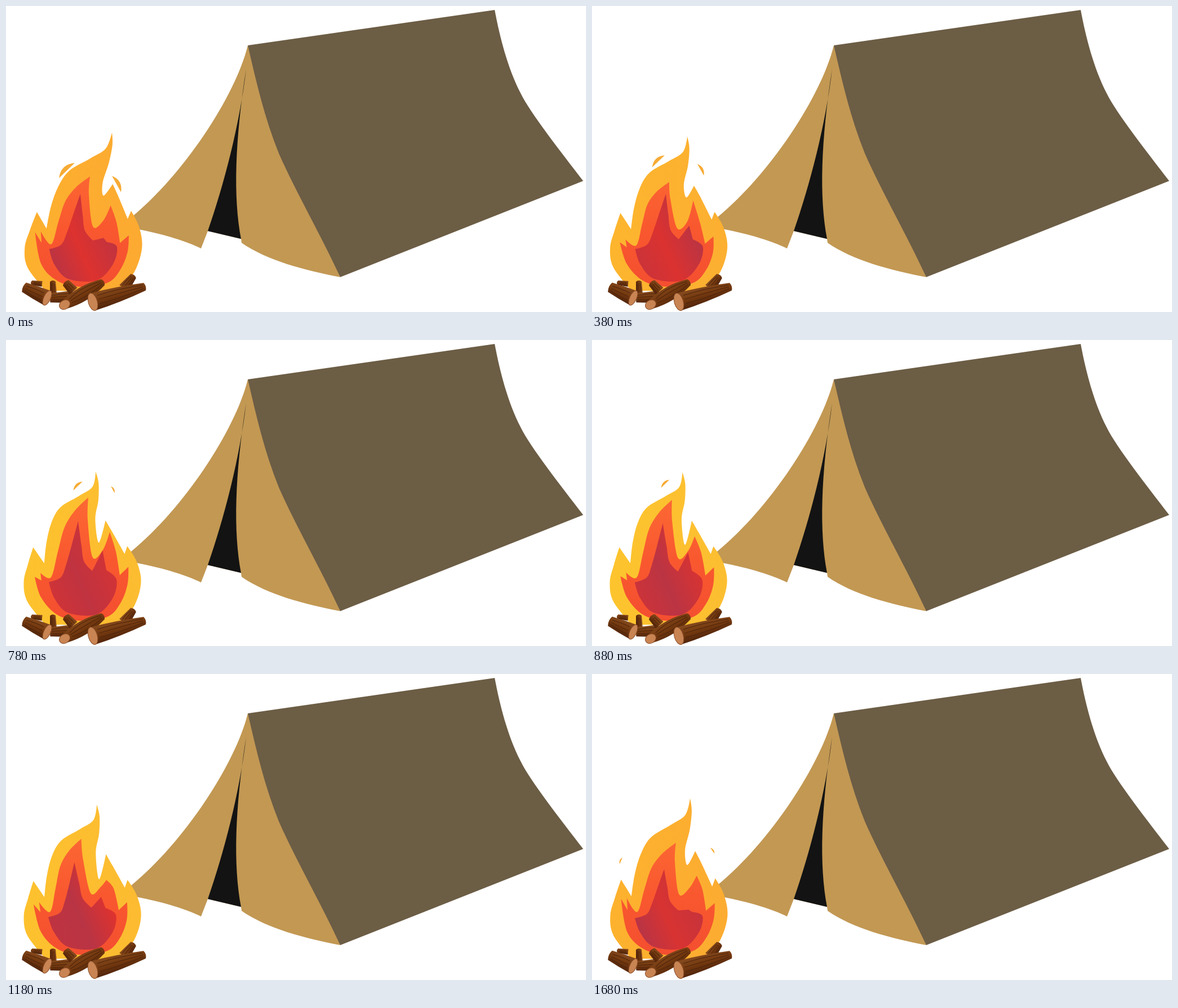
These frames come from a looping animation (1029x544 px, 1.78 s). An HTML page with a canvas:

```html
<!DOCTYPE html>
<html>
<head>
<meta charset="utf-8">
<title>Campfire and tent</title>
<style>
html, body { margin: 0; width: 100%; height: 100%; overflow: hidden; background: #fff; }
canvas { display: block; }
</style>
</head>
<body>
<canvas id="stage" width="1029" height="544"></canvas>
<script>
const ctx = document.getElementById('stage').getContext('2d');
const LOOP = 1780, STEPS = 18, BASE = 495;
const KEYS = [0, 4, 6, 8, 11, 14, 17, STEPS]; // steps at which the tips reach their key places

const points = text => text.split(' ').map(s => {
  const [x, y] = s.replace('*', '').split(',').map(Number);
  return { x, y, corner: s[0] === '*' };
});
const mix = (a, b, k) => a + (b - a) * k;
const wave = (phase, peak) => Math.cos(2 * Math.PI * (phase - peak));

// rest: resting outline, * marks a sharp corner. tip: path of the top point.
// dips: places that sink by a wave, each as x, y, depth and phase of the lowest point.
const outer = {
  rest: points('*167,228 171,249 169,281 162,316 167,350 *180,318 191,338 *212,379 *217,365 233,393 240,430 228,472 *200,508 *70,506 38,465 32,430 40,398 *50,367 *69,396 74,358 84,322 101,294 135,273 160,256'),
  tip: points('188,225 169,232 161,222 159,234 163,237 157,223 174,221'),
  dips: [[166, 350, 15, .6]]
};
const middle = {
  rest: points('*140,294 141,330 152,390 170,378 *181,352 193,381 *201,420 *216,406 215,436 203,468 180,492 130,499 90,488 62,458 *50,411 *62,424 *60,407 79,423 90,381 100,342 117,315'),
  tip: points('149,303 137,313 146,280 146,280 134,293 133,293 149,300'),
  dips: [[181, 352, 16, .73], [52, 411, 13, .4]]
};
const inner = {
  rest: points('*127,333 133,370 138,398 *153,415 *171,396 *178,416 196,428 189,460 160,488 110,485 86,460 *76,432 97,424 106,404 116,371'),
  tip: points('132,334 131,334 131,334 128,322 121,333 122,338 128,347'),
  dips: [[171, 396, -18, .42]]
};

// Each spark starts at x, y, drifts by dx, dy and shrinks along its length vx, vy
const sparks = [
  { from: 0, life: 11, x: 94, y: 306, dx: 35, dy: -53, vx: 28, vy: -27 },
  { from: 0, life: 8, x: 188, y: 302, dx: -2, dy: -42, vx: 16, vy: 29 },
  { from: 13, life: 4, x: 45, y: 378, dx: 4, dy: -40, vx: 12, vy: -28 },
  { from: 13, life: 4, x: 192, y: 310, dx: 18, dy: -1, vx: 17, vy: 25 }
];

function fill(path, color) {
  ctx.fillStyle = color;
  ctx.fill(new Path2D(path));
}

function gradient(x0, y0, x1, y1, colors) {
  const g = ctx.createLinearGradient(x0, y0, x1, y1);
  colors.forEach((c, n) => g.addColorStop(n / (colors.length - 1), c));
  return g;
}

function along(path, step) {
  let i = 0;
  while (step >= KEYS[i + 1]) i++;
  const k = (step - KEYS[i]) / (KEYS[i + 1] - KEYS[i]);
  const a = path[i], b = path[(i + 1) % path.length];
  return { x: mix(a.x, b.x, k), y: mix(a.y, b.y, k) };
}

// The outline follows its tip, more so with height
function bent({ rest, tip, dips }, step) {
  const top = rest[0], now = along(tip, step);
  return rest.map(({ x, y, corner }) => {
    const pull = Math.max(0, (BASE - y) / (BASE - top.y)) ** 2;
    let sink = 0;
    for (const [dx, dy, depth, peak] of dips)
      sink += depth * wave(step / STEPS, peak) * Math.exp(-((x - dx) ** 2 + (y - dy) ** 2) / 300);
    return { x: x + (now.x - top.x) * pull, y: y + (now.y - top.y) * pull + sink, corner };
  });
}

// Smooth closed outline that stays sharp at the corners
function flame(shape, step, color) {
  const pts = bent(shape, step), n = pts.length;
  pts.forEach((p, m) => {
    const prev = pts[(m + n - 1) % n], next = pts[(m + 1) % n];
    p.dx = p.corner ? 0 : (next.x - prev.x) / 6;
    p.dy = p.corner ? 0 : (next.y - prev.y) / 6;
  });
  ctx.beginPath();
  ctx.moveTo(pts[0].x, pts[0].y);
  pts.forEach((p, m) => {
    const q = pts[(m + 1) % n];
    ctx.bezierCurveTo(p.x + p.dx, p.y + p.dy, q.x - q.dx, q.y - q.dy, q.x, q.y);
  });
  ctx.fillStyle = color;
  ctx.fill();
}

function spark({ from, life, x, y, dx, dy, vx, vy }, step) {
  const k = (step - from) / life;
  if (k < 0 || k > 1) return;
  const size = 1 - .58 * k, side = Math.sign(vy) * .4 * size;
  ctx.save();
  ctx.translate(x + dx * k, y + dy * k);
  const ex = vx * size, ey = vy * size;
  const bx = Math.abs(vy) * side, by = -vx * Math.abs(side);
  fill(`M0 0Q${ex / 2 + bx} ${ey / 2 + by} ${ex} ${ey}Q${ex / 2} ${ey / 2} 0 0`, '#f6ab35');
  ctx.restore();
}

function tent() {
  fill('M429 70C407 160 315 300 222 376L212 392L240 398C280 406 320 418 346 431L358 400L417 414L418 421C462 452 530 470 593 482L500 250Z', '#c29853');
  fill('M426 112C415 210 386 320 358 400L417 414C403 340 406 240 426 112Z', '#131313');
  fill('M429 70L867 7C876 55 890 110 913 155C930 190 985 260 1024 311L593 482C560 410 514 330 484 262C459 200 444 135 429 70Z', '#6c5d45');
}

// Tapered log from its near end to its far end, with grain and perhaps a sawn face
function log(x0, y0, x1, y1, r0, r1, bulge = 0, face = 0) {
  const turn = Math.atan2(y1 - y0, x1 - x0), len = Math.hypot(x1 - x0, y1 - y0);
  const mid = (r0 + r1) / 2 + bulge;
  ctx.save();
  ctx.translate(x0, y0);
  ctx.rotate(turn);
  fill(`M0 ${-r0}Q${len / 2} ${-mid} ${len} ${-r1}Q${len + 4} 0 ${len} ${r1}Q${len / 2} ${mid} 0 ${r0}Z`,
    gradient(0, -mid, 0, mid, x1 > x0 ? ['#84491d', '#74390f', '#54260b'] : ['#54260b', '#74390f', '#84491d']));
  ctx.strokeStyle = '#4d240b';
  ctx.lineWidth = 1;
  for (const k of [-.55, -.1, .4])
    ctx.stroke(new Path2D(`M${face + 3} ${r0 * k}Q${len / 2} ${mid * k * 1.3} ${len - 3} ${r1 * k}`));
  if (face) {
    ctx.beginPath();
    ctx.ellipse(0, 0, face, r0, 0, 0, 7);
    ctx.fillStyle = '#c98453';
    ctx.fill();
    ctx.strokeStyle = '#8a4d27';
    ctx.stroke();
  }
  ctx.restore();
}

function logs() {
  log(64, 494, 46, 492, 5, 4);
  log(84, 512, 83, 490, 6, 5);
  log(78, 519, 118, 517, 8, 11);
  log(120, 507, 106, 492, 9, 7);
  log(209, 502, 226, 480, 10, 6);
  log(73, 519, 32, 500, 14, 9, 1, 6);
  log(104, 531, 172, 491, 8, 6, 11, 10);
  log(154, 526, 246, 499, 16, 7, 3, 8);
}

function draw(step) {
  const phase = step / STEPS;
  ctx.fillStyle = '#fff';
  ctx.fillRect(0, 0, 1029, 544);
  tent();
  const yellow = 186 - 10 * wave(phase, .05);
  flame(outer, step, gradient(35, 0, 240, 0, [`rgb(253,${yellow},46)`, `rgb(252,${yellow - 6},49)`]));
  flame(middle, step, gradient(0, 290, 0, 495, ['#fc6733', '#f9582f', '#f44f30']));
  const heat = [.3 + .3 * wave(phase, .4), .5 + .4 * wave(phase, .1), .5 - .4 * wave(phase, .15)];
  flame(inner, step, gradient(80, 470, 195, 420,
    heat.map(h => `rgb(${mix(178, 230, h)},${mix(52, 50, h)},${mix(72, 42, h)})`)));
  sparks.forEach(s => spark(s, step));
  logs();
}

let start;
function tick() {
  const now = performance.now();
  start ??= now;
  const t = (now - start) % LOOP;
  draw(t < 100 ? 0 : Math.floor((t + 20) / 100));
  requestAnimationFrame(tick);
}
requestAnimationFrame(tick);
</script>
</body>
</html>
```
